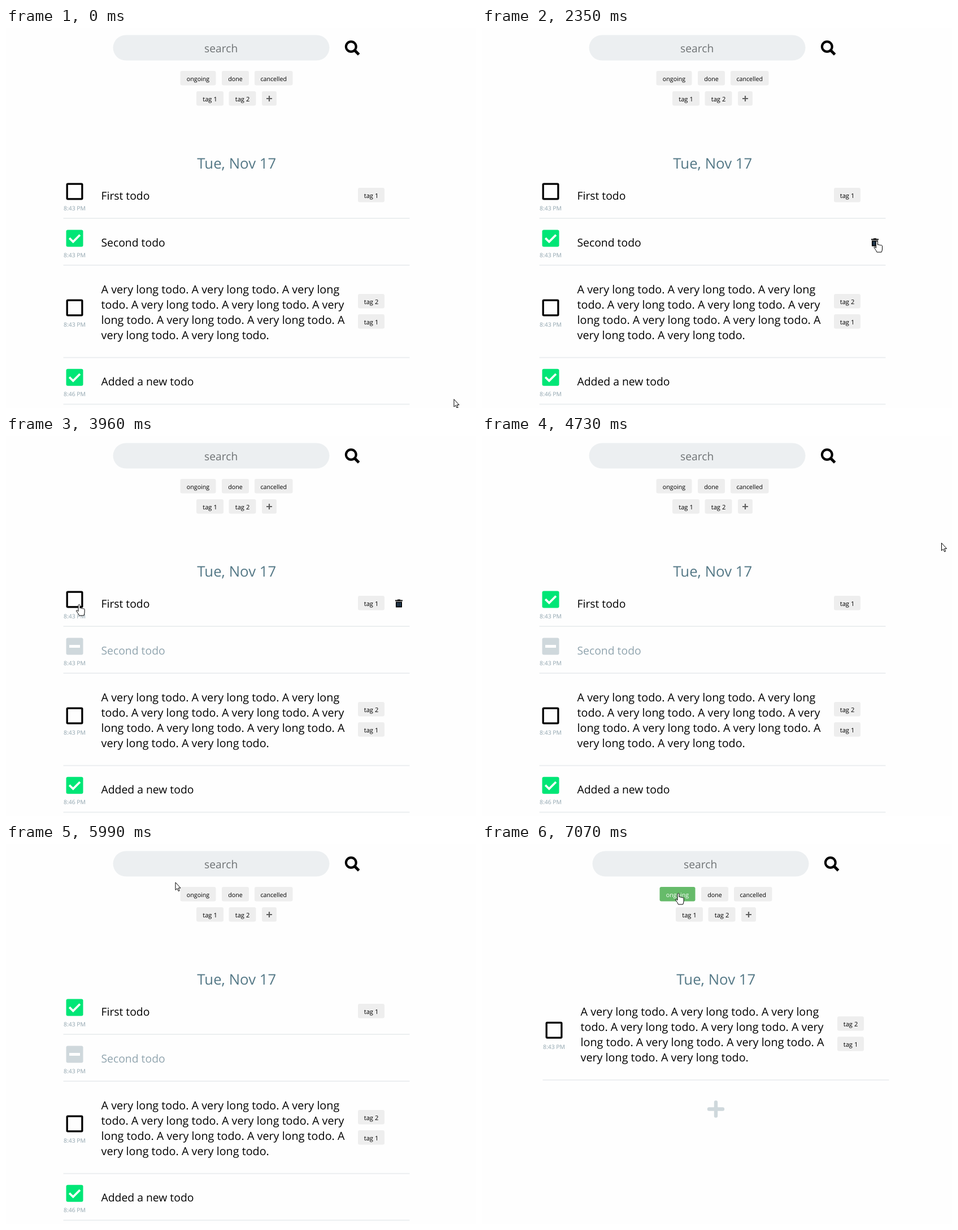
Recreate the animation shown at these times as an HTML page. Size 832 by 673 pixels, loop 8 s.

```html
<!DOCTYPE html>
<html lang="en">
<head>
<meta charset="utf-8">
<title>Todo list</title>
<style>
  html, body { margin: 0; width: 100%; height: 100%; overflow: hidden; background: #fefefe; }
  svg { display: block; width: 832px; height: 673px; }
  text { font-family: "Open Sans", "Noto Sans", sans-serif; text-rendering: geometricPrecision; }
  .mid { text-anchor: middle; }
  .line { font-size: 19.75px; }
  .short { font-size: 19.35px; }
  .time { font-size: 10.4px; fill: #90a4ae; }
  .status { font-size: 10.7px; }
  .tag { font-size: 11.2px; }
  .search { font-size: 19.3px; fill: #6f7375; }
  .date { font-size: 25.8px; fill: #547886; }
</style>
</head>
<body>
<svg id="stage" viewBox="0 0 832 673" xmlns="http://www.w3.org/2000/svg"></svg>
<script>
const LOOP = 8000, CANCEL = 2580, CHECK = 4200, FILTER = 7070;

const text = (x, y, cls, str) => `<text x="${x}" y="${y}" class="${cls}">${str}</text>`;

const chip = (x, y, w, label, cls = 'tag') =>
  `<g class="chip ${label}"><rect x="${x}" y="${y}" width="${w}" height="25.5" rx="3" fill="#eee"/>` +
  text(x + w / 2, y + 17.5, cls + ' mid', label) + '</g>';

const plus = (x, y, r, w, color, cap) =>
  `<path d="M${x - r} ${y}h${2 * r}M${x} ${y - r}v${2 * r}" stroke="${color}" stroke-width="${w}" stroke-linecap="${cap}"/>`;

const square = color => `<rect x="-15" y="-15" width="30" height="30" rx="3" fill="${color}"/>`;
const marks = {
  open: square('#000') + '<rect x="-11.7" y="-11.7" width="23.4" height="23.4" fill="#fefefe"/>',
  done: square('#00e676') +
    '<path d="M-8 .9L-2.7 6.1 8.1-4.7" fill="none" stroke="#fff" stroke-width="3.7" stroke-linecap="square"/>',
  off: square('#cfd8dc') + '<path d="M-9.5 0h19" stroke="#fff" stroke-width="5"/>'
};

const trash = y => `<g class="trash" transform="translate(689 ${y})">
  <path d="M0 1h4V0h5v1h4v2H0zM1 4h11v10H1z"/>
  <path d="M3.7 5.6v6.6m2.8 0V5.6m2.8 0v6.6" fill="none" stroke="#5288ba"/></g>`;

// y is the centre of the checkbox
const row = (id, y, kinds, time, body, drop = 46.7) => `<g id="${id}">` +
  kinds.map(k => `<g class="${k}" transform="translate(121.5 ${y})">${marks[k]}</g>`).join('') +
  text(121.5, y + 33.2, 'time mid', time) + body +
  `<rect x="101.5" y="${y + drop}" width="613" height="1.8" fill="#eaedef"/></g>`;

const title = (y, str) => text(168.5, y + 14.5, 'short title', str);

const words = ['A very long todo. A very long todo. A very long',
  'todo. A very long todo. A very long todo. A very',
  'long todo. A very long todo. A very long todo. A',
  'very long todo. A very long todo.'];

const rowY = { first: 289.5, second: 372.5, third: 495.5, fourth: 618.8 };

const cursors = {
  arrow: 'M.5.5V14l3-2.7 2.2 4.7 2-.9-2.1-4.6h4z',
  hand: 'M-1.5 12V1.5q1.5-2.5 3 0V7' + 'q1.4-1.6 2.7.6'.repeat(3) + 'V14q0 3-1.5 6H0q-1-3-5-8 0-3 3.5.5z',
  beam: 'M-3-6.5H3M0-6V6M-3 6.5H3'
};

const stage = document.getElementById('stage');
stage.innerHTML = '<g id="head">' +
  '<rect x="189.5" y="12.5" width="383" height="45" rx="22.5" fill="#eceff1"/>' +
  text(380.7, 42.5, 'search mid', 'search') +
  '<g fill="none" stroke="#000"><circle cx="610.8" cy="33" r="8.9" stroke-width="4.1"/>' +
  '<path d="M617.5 39.7l7.2 7.2" stroke-width="5"/></g>' +
  chip(308.5, 76, 63, 'ongoing', 'status') +
  chip(382, 76, 48, 'done', 'status') +
  chip(440, 76, 67.5, 'cancelled', 'status') +
  chip(337, 112, 48, 'tag 1') + chip(394.5, 112, 48, 'tag 2') +
  chip(453, 112, 26, '') + plus(466, 125, 5, 2.2, '#616161', 'butt') +
  text(408.3, 249, 'date mid', 'Tue, Nov 17') + '</g>' +
  row('first', rowY.first, ['open', 'done'], '8:43 PM',
    title(rowY.first, 'First todo') + chip(623, 283, 47, 'tag 1') + trash(rowY.first)) +
  row('second', rowY.second, ['done', 'off'], '8:43 PM',
    title(rowY.second, 'Second todo') + trash(rowY.second)) +
  row('third', rowY.third, ['open'], '8:43 PM',
    words.map((s, i) => text(168.5, 470 + 27 * i, 'line', s)).join('') +
    chip(623, 471, 47, 'tag 2') + chip(623, 507, 47, 'tag 1'), 87.2) +
  row('fourth', rowY.fourth, ['done'], '8:46 PM', title(rowY.fourth, 'Added a new todo')) +
  '<g id="add">' + plus(414, 469.5, 12, 6.4, '#cfd8dc', 'round') + '</g>' +
  '<g id="cursor" fill="#fff" stroke="#000" stroke-linejoin="round">' +
  Object.keys(cursors).map(k => `<path class="${k}" d="${cursors[k]}"/>`).join('') + '</g>';

// Pointer moves: start, end, then evenly timed points
const STEP = 78;
const moves = [
  [0, 0, 792.5, 657],
  [70, 220, 786, 540, 763, 390, 769, 338],
  [1320, 2090, 754, 342, 610, 390, 751, 376],
  [2260, 2340, 714, 377, 699, 377],
  [2660, 3060, 680, 365, 440, 233],
  [3170, 3710, 427, 243, 230, 396, 133, 310],
  [3870, 4020, 131, 306, 128, 290],
  [4200, 4730, 128, 290, 813, 189],
  [4960, 5200, 806, 192, 692, 182],
  [5360, 5832, 650, 170, 261, 80],
  [5911, 5990, 280, 74, 299.5, 67.5],
  [6070, 6310, 318, 75, 342, 86],
  [6920, 6920, 341, 77],
  [7070, 7070, 347.5, 87]
];

function pointer(t) {
  const [start, end, ...pts] = moves.filter(m => m[0] <= t).pop();
  const steps = Math.round((end - start) / STEP);
  if (!steps) return pts;
  const k = Math.min(steps, Math.floor((t - start) / (end - start) * steps + 0.02));
  const last = pts.length / 2 - 1, pos = k / steps * last;
  const i = Math.min(last - 1, Math.floor(pos)), u = pos - i;
  return [0, 1].map(n => pts[2 * i + n] * (1 - u) + pts[2 * i + 2 + n] * u);
}

const $ = sel => stage.querySelector(sel);
const show = (sel, on) => { $(sel).style.display = on ? '' : 'none'; };

function draw(t) {
  const [x, y] = pointer(t);
  const near = (l, r, mid, reach) => x >= l && x <= r && Math.abs(y - mid) <= reach;
  const filtered = t >= FILTER, cancelled = t >= CANCEL, checked = t >= CHECK;

  show('#first .open', !checked);
  show('#first .done', checked);
  show('#second .done', !cancelled);
  show('#second .off', cancelled);
  ['first', 'second'].forEach(id => show(`#${id} .trash`, near(101, 714, rowY[id] + 6, 40)));
  $('#second .title').setAttribute('fill', cancelled ? '#90a4ae' : '#000');

  ['first', 'second', 'fourth'].forEach(id => show('#' + id, !filtered));
  show('#add', filtered);
  $('#head').setAttribute('transform', `translate(${filtered ? 6 : 0} 0)`);
  $('#third').setAttribute('transform', filtered ? 'translate(6 -165.7)' : 'translate(0 0)');
  $('.ongoing rect').setAttribute('fill', filtered ? '#66bb6a' : '#eee');
  $('.ongoing text').setAttribute('fill', filtered ? '#fff' : '#000');

  const hand = near(106, 137, rowY.first, 15) || near(686, 705, rowY.second + 6, 11) || near(309, 377, 89, 13);
  const beam = near(338, 479, 240, 14) || near(169, 254, 297, 13) || near(169, 283, 380, 13);
  show('.hand', hand);
  show('.beam', beam && !hand);
  show('.arrow', !hand && !beam);
  $('#cursor').setAttribute('transform', `translate(${x} ${y})`);
}

const origin = performance.now();
function tick() {
  draw((performance.now() - origin) % LOOP);
  requestAnimationFrame(tick);
}
tick();
</script>
</body>
</html>
```
